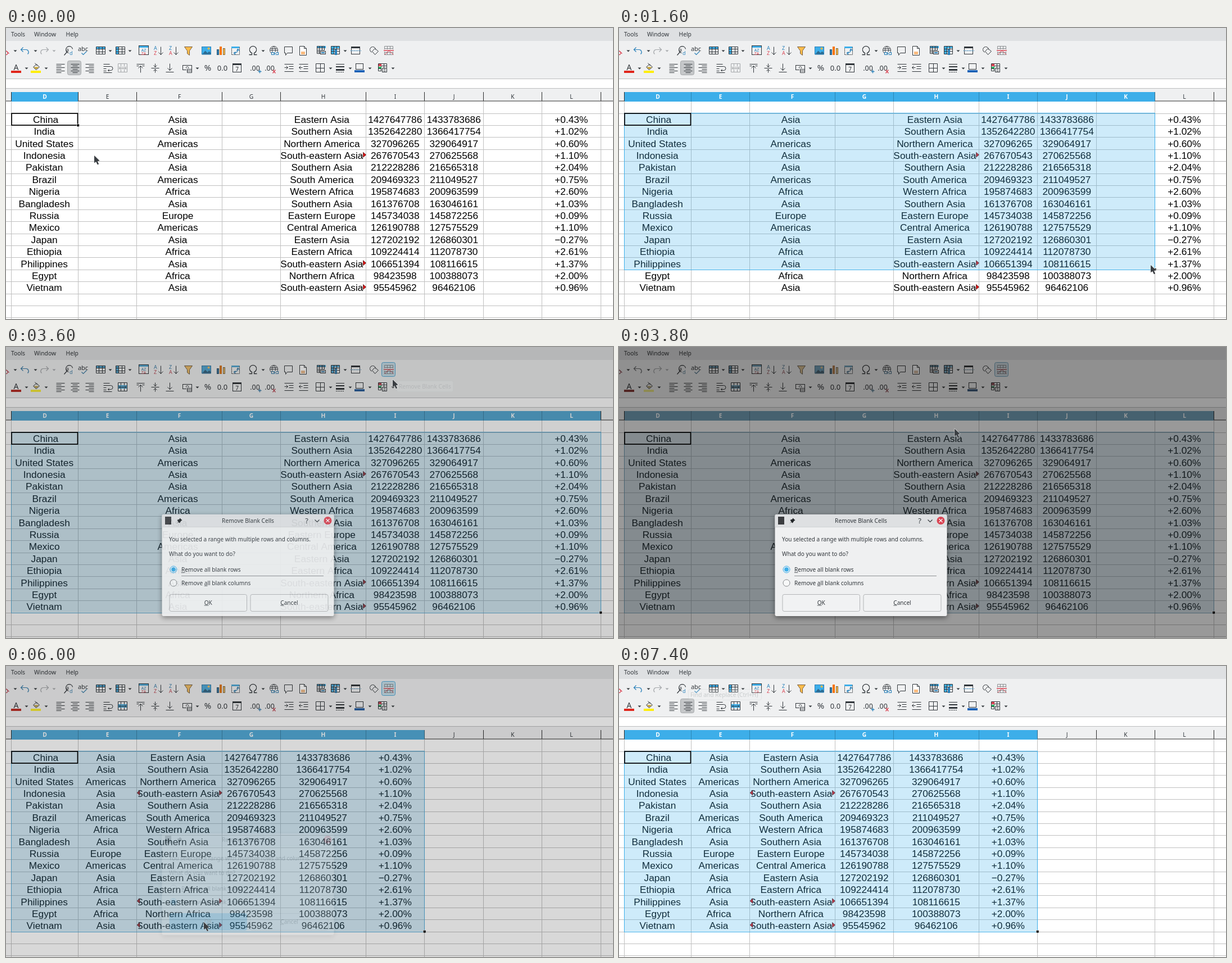
Recreate the animation shown at these times as an HTML page with a canvas. Size 1080x518 px, loop 7500 ms.

```html
<!DOCTYPE html>
<html lang="en">
<head>
<meta charset="utf-8">
<title>Remove blank columns</title>
<style>
  html, body { margin: 0; width: 100%; height: 100%; overflow: hidden; background: #eff0f1; }
  canvas { position: absolute; left: 0; top: 0; }
</style>
</head>
<body>
<script>
const W = 1080, H = 518, LOOP = 7500, STEP = 100;
const INK = '#31363b', BLUE = '#2980b9', SKY = '#3daee9', RED = '#da4453', PALE = '#eff0f1', OFF = '#a5a8ab';
const UI = '"Noto Sans", sans-serif';
const colX = [9.5, 128, 232.5, 384, 488.5, 640, 744.5, 849, 953.5, 1058];
const ROW0 = 151.7, ROWH = 21.39;
const rowY = i => Math.round(ROW0 + i * ROWH) + .5;

const rows = `China|Asia|Eastern Asia|1427647786|1433783686|+0.43%
India|Asia|Southern Asia|1352642280|1366417754|+1.02%
United States|Americas|Northern America|327096265|329064917|+0.60%
Indonesia|Asia|South-eastern Asia|267670543|270625568|+1.10%
Pakistan|Asia|Southern Asia|212228286|216565318|+2.04%
Brazil|Americas|South America|209469323|211049527|+0.75%
Nigeria|Africa|Western Africa|195874683|200963599|+2.60%
Bangladesh|Asia|Southern Asia|161376708|163046161|+1.03%
Russia|Europe|Eastern Europe|145734038|145872256|+0.09%
Mexico|Americas|Central America|126190788|127575529|+1.10%
Japan|Asia|Eastern Asia|127202192|126860301|−0.27%
Ethiopia|Africa|Eastern Africa|109224414|112078730|+2.61%
Philippines|Asia|South-eastern Asia|106651394|108116615|+1.37%
Egypt|Africa|Northern Africa|98423598|100388073|+2.00%
Vietnam|Asia|South-eastern Asia|95545962|96462106|+0.96%`.split('\n').map(r => r.split('|'));
const shift = [-.6, -2.7, -2.4, 0, 0, 0];
const sparse = [0, 2, 4, 5, 6, 8], packed = [0, 1, 2, 3, 4, 5];

// pointer tip: time, x, y
const path = [[0, 157, 227], [600, 74, 163], [800, 70, 163], [900, 140, 180], [1600, 946, 422],
  [2100, 985, 454], [2200, 985, 454], [2300, 930, 370], [2400, 832, 250], [2700, 832, 250],
  [2800, 720, 74], [3000, 688, 46], [3300, 685, 42], [3500, 688, 58], [3600, 688, 58],
  [4300, 370, 364], [4700, 367, 417], [5100, 367, 418], [5600, 352, 456], [6200, 352, 456],
  [6300, 314, 405], [6600, 314, 405], [6900, 112, 42], [7200, 110, 34], [7300, 42, 0], [7400, 42, -40]];
const dimKeys = [[3500, 0], [3600, .46], [3700, .82], [3800, 1], [5900, 1], [6000, .38], [6100, 0]];
const dialogKeys = [[3400, 0], [3500, .5], [3600, .9], [3700, 1], [5900, 1], [6000, .17], [6100, .03], [6200, .03], [6300, 0]];

function at(keys, t, k = 1) {
  if (t <= keys[0][0]) return keys[0][k];
  for (let i = 1; i < keys.length; i++) {
    const a = keys[i - 1], b = keys[i];
    if (t <= b[0]) return a[k] + (b[k] - a[k]) * (t - a[0]) / (b[0] - a[0]);
  }
  return keys[keys.length - 1][k];
}

function layer() {
  const c = document.createElement('canvas');
  c.width = W; c.height = H;
  document.body.append(c);
  return c;
}
const sheet = layer(), dialog = layer(), front = layer();
let g;

function rect(x, y, w, h, color) { g.fillStyle = color; g.fillRect(x, y, w, h); }
function frame(x, y, w, h, color, lw = 1) { g.strokeStyle = color; g.lineWidth = lw; g.strokeRect(x, y, w, h); }
function line(x1, y1, x2, y2, color, lw = 1) {
  g.strokeStyle = color; g.lineWidth = lw;
  g.beginPath(); g.moveTo(x1, y1); g.lineTo(x2, y2); g.stroke();
}
function text(s, x, y, size, color = INK, align = 'left', weight = '', family = UI) {
  g.font = `${weight} ${size}px ${family}`;
  g.textAlign = align; g.fillStyle = color;
  g.fillText(s, x, y);
}
function draw(x, y, d, color, lw) {
  g.save();
  g.translate(x + .5, y + .5);
  const p = new Path2D(d);
  if (lw) { g.strokeStyle = color; g.lineWidth = lw; g.stroke(p); }
  else { g.fillStyle = color; g.fill(p); }
  g.restore();
}
const pen = (x, y, d, color = INK, lw = 1) => draw(x, y, d, color, lw);
const fill = (x, y, d, color = INK) => draw(x, y, d, color);
const drop = (x, y, color = INK) => fill(x, y, 'M-3 -1h6l-3 3z', color);
function box(x, y, w, h, r, face, edge) {
  g.beginPath(); g.roundRect(x, y, w, h, r);
  if (face) { g.fillStyle = face; g.fill(); }
  if (edge) { g.strokeStyle = edge; g.lineWidth = 1; g.stroke(); }
}
function grid(x, y, w, h, nx, ny, color = INK) {
  let d = '';
  for (let i = 0; i <= nx; i++) d += `M${Math.round(w * i / nx)} 0v${h}`;
  for (let j = 0; j <= ny; j++) d += `M0 ${Math.round(h * j / ny)}h${w}`;
  pen(x, y, d, color);
}
// stack of horizontal bars; anchor -1 left, 0 centre, 1 right
function bars(x, y, anchor) {
  for (let i = 0; i < 6; i++) {
    const w = i % 2 ? 9 : 15;
    pen(x - 7, y - 7 + i * 3, `M${(15 - w) * (anchor + 1) / 2} 0h${w}`);
  }
}

function topIcons(undoOn, removeOn) {
  const y = 40;
  pen(0, 41, 'M-4 -4L5 4M-1 6A3 3 0 1 0 0 0', RED, 1.3);
  drop(16, y);
  const undo = undoOn ? BLUE : '#6b6e70';
  pen(33, y, 'M-3 -6L-7 -2L-3 2M-7 -2H2A4.5 4.5 0 0 1 5 6', undo, 1.2);
  drop(52, y);
  pen(68, y, 'M3 -6L7 -2L3 2M7 -2H-2A4.5 4.5 0 0 0 -5 6', OFF, 1.2);
  drop(85, y, OFF);
  pen(111, y, 'M-2 1L-8 8M7 -3A6 6 0 1 0 0 4', INK, 1.2);
  text('a', 107, 42, 9); text('d', 113, 48, 9, BLUE);
  text('abc', 137, 41, 11, INK, 'center');
  pen(137, y, 'M-3 4l3 3l6 -6', BLUE, 1.2);

  rect(161, 33, 16, 5, SKY); grid(160, 33, 16, 13, 3, 3); drop(185, y);
  rect(196, 33, 5, 14, SKY); grid(195, 33, 16, 13, 3, 3); drop(220, y);

  frame(236.5, 31.5, 17, 16, INK); rect(237, 32, 16, 3, SKY);
  text('AZ', 245, 42, 7, BLUE, 'center'); text('ZA', 245, 48, 7, RED, 'center');
  const sort = (x, a, b) => {
    text(a, x - 8, 39, 9, BLUE); text(b, x - 8, 48, 9, RED);
    pen(x, y, 'M4 -7V7M0 3l4 4l4 -4');
  };
  sort(271, 'A', 'Z'); sort(298, 'Z', 'A');
  fill(324, y, 'M-7 -7H7L2 0V8L-2 5V0Z', '#fdbc4b'); pen(324, y, 'M-7 -7H7L2 0V8L-2 5V0Z', '#7a6040');

  rect(348, 33, 17, 14, SKY); fill(356, y, 'M-8 7L-2 0L2 4L5 1L8 4V7Z', '#2d6a8f');
  fill(360, 36, 'M0 -2a2 2 0 1 0 .1 0z', '#fdbc4b'); frame(348.5, 33.5, 16, 13, BLUE);
  rect(375, 38, 4, 10, BLUE); rect(380, 33, 4, 15, '#f67400'); rect(386, 36, 4, 12, '#fdbc4b');
  frame(375.5, 38.5, 3, 9, INK, .6); frame(386.5, 36.5, 3, 11, INK, .6);
  g.setLineDash([2, 1]); frame(401.5, 33.5, 14, 14, INK); g.setLineDash([]);
  rect(401, 33, 14, 3, SKY); pen(408, y, 'M-3 4Q4 4 4 -2M2 0l2 -3l3 3M0 2l-3 2l3 3', BLUE, 1.2);

  pen(439, y, 'M-7 7H-2V4A6.2 6.2 0 1 1 2 4V7H7', INK, 1.3); drop(457, y);
  pen(476, 39, 'M0 -7A7 7 0 1 0 .1 -7M-7 0H7M0 -7C-4 -3 -4 3 0 7C4 3 4 -3 0 -7M-6 -3H6', INK, .9);
  rect(472, 43, 12, 5, PALE); pen(477, 45, 'M-4 -2H0V2H-5V-2ZM3 -2H7V2H2M-2 0H4', BLUE, 1.1);
  pen(502, y, 'M-7 -7H7V4H-2L-5 8V4H-7Z');
  fill(528, y, 'M-6 -8H2L6 -4V8H-6Z', '#fff'); pen(528, y, 'M-6 -8H2L6 -4V8H-6ZM2 -8V-4H6');
  rect(525, 42, 7, 5, '#f9b97c');

  rect(553, 32, 16, 4, SKY); grid(553, 32, 13, 13, 3, 4);
  rect(559, 40, 11, 7, PALE); frame(559.5, 41.5, 9, 5, INK); rect(561, 43, 6, 2, BLUE);
  rect(579, 32, 14, 4, SKY); rect(579, 32, 4, 14, SKY); grid(578, 32, 15, 14, 3, 3);
  rect(585, 38, 4, 10, BLUE); drop(603, y);
  frame(614.5, 33.5, 15, 13, INK); rect(614, 33, 16, 3, INK);
  g.setLineDash([2, 1]); line(613, 40.5, 632, 40.5, BLUE); g.setLineDash([]);
  pen(652, 38, 'M0 -5A5 5 0 1 0 .1 -5'); fill(656, 42, 'M-1 -5L5 -1L-1 5L-6 1Z', PALE); pen(656, 41, 'M0 -5L6 0L0 6L-5 0Z');

  if (removeOn) box(668.5, 27.5, 24, 25, 3, 'rgba(61,174,233,.25)', SKY);
  grid(673, 32, 15, 15, 3, 4, '#8b8e91');
  rect(672, 38, 18, 4, PALE); line(672, 40, 690, 40, RED, 1.5);
  pen(681, 43, 'M-8 4L0 -3L8 4', RED);
}

function formatIcons(centred, mergeOn) {
  const y = 71;
  text('A', 18, 75, 14, INK, 'center'); rect(9, 76, 18, 4, '#e0251b'); drop(36, y);
  pen(53, 69, 'M-5 0L1 -5L6 0L0 5ZM-2 -7L2 -2'); fill(53, 69, 'M-4 0H5L0 4Z', '#c9a227');
  rect(44, 76, 18, 4, '#ffee00'); drop(71, y);
  if (centred) box(109.5, 58.5, 24, 25, 3, '#c5c7c9', '#a4a7a9');
  bars(96, y, -1); bars(122, y, 0); bars(148, y, 1);
  pen(181, y, 'M-8 -7H3M-8 -3H5A3 3 0 0 1 5 4H0M2 2L0 4L2 6M-8 1H-3M-8 5H-3M-8 8H7');
  const m = mergeOn ? INK : OFF;
  grid(199, 63, 16, 15, 3, 3, m); rect(200, 68, 15, 6, mergeOn ? SKY : '#dfe0e1');
  pen(207, y, 'M-6 0H6M-4 -2L-6 0L-4 2M4 -2L6 0L4 2', m);
  pen(239, y, 'M-7 -7H7M0 8V-4M-4 0L0 -4L4 0M-7 -4H-3M3 -4H7');
  pen(265, y, 'M-7 0H7M0 -8V-2M-3 -5L0 -2L3 -5M0 8V2M-3 5L0 2L3 5');
  pen(291, y, 'M-7 7H7M0 -8V4M-4 0L0 4L4 0');

  frame(314.5, 66.5, 16, 8, INK); pen(322, 70, 'M0 -2a2 2 0 1 0 .1 0');
  rect(321, 72, 9, 8, PALE); pen(326, 76, 'M-4 -3H4M-4 0H4M-4 3H4M-4 -3V3M4 -3V3'); drop(340, y);
  text('%', 359, 76, 15, INK, 'center');
  text('0.0', 385, 76, 13, INK, 'center');
  frame(403.5, 63.5, 15, 15, INK); rect(403, 63, 16, 3, INK); text('7', 411, 77, 10, INK, 'center');
  text('.00', 443, 76, 12.5, INK, 'center'); text('.00', 469, 76, 12.5, INK, 'center');
  pen(450, 77, 'M-2 0H4M1 -3V3', BLUE, 1.3); pen(476, 77, 'M-2 -3L3 3M3 -3L-2 3', RED, 1.3);
  pen(503, y, 'M-8 -7H8M0 -3H8M0 1H8M-8 6H8M-8 -1H-2M-5 -4L-2 -1L-5 2');
  pen(529, y, 'M-8 -7H8M0 -3H8M0 1H8M-8 6H8M-8 -1H-2M-5 -4L-8 -1L-5 2');
  grid(551, 63, 15, 15, 2, 2); drop(577, y);
  rect(587, 64, 15, 1, INK); rect(587, 68, 15, 2, INK); rect(587, 73, 15, 3, INK);
  g.setLineDash([2, 1]); line(587, 78.5, 602, 78.5, INK); g.setLineDash([]); drop(612, y);
  frame(622.5, 63.5, 13, 10, INK); rect(620, 75, 18, 4, '#1c63b7'); drop(647, y);
  grid(662, 63, 15, 13, 3, 3); rect(663, 64, 5, 4, RED); rect(663, 69, 5, 3, '#27ae60');
  rect(668, 71, 10, 8, PALE); pen(672, 74, 'M-3 -3H5V4H-3ZM-1 -1H3M-1 2H3'); drop(688, y);
}

function selection(t, x, y) {
  if (t < 900) return { c: 1, r: 1 };
  if (t >= 6000) return { c: 6, r: 15 };
  if (t >= 2100) return { c: 9, r: 15 };
  return {
    c: Math.max(1, colX.filter(v => v < (t === 1600 ? 946 : x)).length),
    r: Math.min(15, Math.floor((y - ROW0) / ROWH) + 1)
  };
}

function cells(place, tight) {
  const size = 17.3, family = '"Liberation Sans", Arial, sans-serif';
  rows.forEach((row, i) => row.forEach((s, k) => {
    const c = place[k], left = colX[c], right = colX[c + 1];
    const mid = (left + right) / 2 + (i + k ? shift[k] : 1.8);
    const cy = ROW0 + (i + .5) * ROWH, long = s.length > 17;
    g.save();
    g.beginPath(); g.rect(left + (long && tight ? 3 : .5), cy - 11, right - left, 22); g.clip();
    text(s, mid, cy + 6.5, size, '#000', 'center', '', family);
    g.restore();
    if (long) {
      const mark = (x, dir) => {
        const d = `M0 -4.5L${5 * dir} 0L0 4.5Z`;
        fill(x, cy - 1.3, d, '#e01010'); pen(x, cy - 1.3, d, '#3a0a0a', .7);
      };
      mark(right - 5, 1);
      if (tight) mark(left + 5, -1);
    }
  }));
}

function drawSheet(t, x, y) {
  g = sheet.getContext('2d');
  rect(0, 0, W, H, '#fff');
  rect(0, 0, W, 23, '#dee0e2');
  rect(0, 23, W, 107, PALE);
  text('Tools', 9, 15, 10.3); text('Window', 50, 15, 10.3); text('Help', 106.5, 15, 10.3);
  topIcons(t < 3700 || t >= 6000, t >= 3100 && t < 6100);
  formatIcons(t < 2800 || t >= 6100, t >= 2800);
  rect(0, 91, W, 17, '#fff');
  line(0, 90.5, W, 90.5, '#bcbebf'); line(0, 107.5, W, 107.5, '#bcbebf');

  const sel = selection(t, x, y);
  colX.forEach(v => line(Math.floor(v) + .5, 131, Math.floor(v) + .5, H, '#c0c0c0'));
  for (let i = 0; i < 18; i++) line(0, rowY(i), W, rowY(i), '#c0c0c0');
  cells(t < 6000 ? sparse : packed, t >= 6000);

  line(0, 130, W, 130, '#2b2b2b');
  colX.forEach(v => line(Math.floor(v) + .5, 114, Math.floor(v) + .5, 130, '#2b2b2b'));
  const right = colX[sel.c], bottom = ROW0 + sel.r * ROWH;
  rect(10, 114, right - 10, 17, SKY);
  for (let c = 1; c < sel.c; c++) line(Math.floor(colX[c]) + .5, 114, Math.floor(colX[c]) + .5, 131, '#2b86b5');
  [...'DEFGHIJKL'].forEach((s, c) => {
    const on = c < sel.c;
    text(s, (colX[c] + colX[c + 1]) / 2 + .3, 126, 10.3, on ? '#fff' : INK, 'center', on ? 'bold' : '');
  });

  if (sel.c > 1 || sel.r > 1) {
    rect(9.5, 152, right - 9.5, bottom - 152, 'rgba(61,174,233,.25)');
    frame(9.5, 151.5, Math.floor(right) - 9, Math.round(bottom) - 151, SKY);
  }
  frame(10, 152, 117.5, 21, '#000', 1.7);
  rect(right - 2.5, bottom - 2.5, 5, 5, '#fff');
  rect(right - 1.8, bottom - 1.8, 4, 4, '#000');

  const v = at(dimKeys, t);
  sheet.style.filter = v ? `brightness(${1 - .4 * v}) saturate(${1 - .6 * v})` : 'none';
}

// label whose letter at index k is underlined
function label(s, x, y, k) {
  text(s, x, y, 10.1);
  const a = x + g.measureText(s.slice(0, k)).width;
  line(a, y + 1.5, a + g.measureText(s[k]).width, y + 1.5, INK, .8);
}
function radio(y, on, hover) {
  g.beginPath(); g.arc(298, y, 6, 0, 7);
  g.fillStyle = on ? '#dcebf4' : '#f7f8f8'; g.fill();
  g.strokeStyle = on || hover ? SKY : '#85888b'; g.lineWidth = 1; g.stroke();
  if (on) { g.beginPath(); g.arc(298, y, 3.8, 0, 7); g.fillStyle = SKY; g.fill(); }
}
function button(x, w, s, mode) {
  box(x, 440.5, w, 30, 3, mode === 2 ? SKY : '#f1f2f3', mode ? SKY : '#b3b5b7');
  g.font = `10.1px ${UI}`;
  label(s, x + (w - g.measureText(s).width) / 2, 458.5, 0);
}

function drawDialog(t) {
  const alpha = at(dialogKeys, t);
  dialog.style.opacity = alpha;
  g = dialog.getContext('2d');
  g.clearRect(0, 0, W, H);
  if (!alpha) return;
  g.save();
  g.shadowColor = 'rgba(0,0,0,.45)'; g.shadowBlur = 10; g.shadowOffsetY = 3;
  box(277.5, 298, 306, 181, 3, PALE);
  g.restore();
  box(277.5, 298, 306, 22, [3, 3, 0, 0], '#dee0e2');
  line(278, 320.5, 583, 320.5, '#d0d2d4');
  rect(283, 302, 11, 14, '#3b3d40');
  fill(308, 309, 'M1 -5L5 -1L3 0L1 3L0 4L-2 2L-5 5L-2 1L-4 -1L-3 -2L0 -3Z', '#232629');
  text('Remove Blank Cells', 430.5, 313, 10.2, INK, 'center');
  text('?', 535, 314, 13, INK, 'center');
  pen(553, 309, 'M-4 -2L0 2L4 -2', INK, 1.1);
  g.beginPath(); g.arc(572.5, 309, 7, 0, 7); g.fillStyle = RED; g.fill();
  pen(572, 308.5, 'M-3 -3L3 3M3 -3L-3 3', '#fff', 1.1);

  text('You selected a range with multiple rows and columns.', 290, 346, 10);
  text('What do you want to do?', 290, 371.5, 10.1);
  const columns = t >= 5000, pressed = t >= 5800;
  radio(396, !columns, false);
  radio(420, columns, t >= 4600 && t < 5400);
  label('Remove all blank rows', 312, 400, 0);
  label('Remove all blank columns', 312, 423.7, 7);
  if (!pressed) {
    const y = columns ? 431.5 : 407.5;
    line(312, y, 565, y, columns ? SKY : '#8d9093');
  }
  button(291, 137.5, 'OK', pressed ? 2 : t >= 5500 ? 1 : 0);
  button(435, 138, 'Cancel', 0);
}

function tip(s, x, y, w, alpha) {
  if (!alpha) return;
  g.globalAlpha = alpha;
  box(x + .5, y + .5, w, 19, 3, 'rgba(239,240,241,.92)', '#b4b7ba');
  text(s, x + 4, y + 14, 10.2);
  g.globalAlpha = 1;
}

function drawFront(t, x, y) {
  g = front.getContext('2d');
  g.clearRect(0, 0, W, H);
  if (t >= 2800 && t < 3000) tip('Input line', 749, 121, 53, t < 2900 ? .92 : .4);
  if (t === 3500) tip('Remove Blank Cells', 695, 60, 100, .7);
  if (t === 3600) tip('Remove Blank Cells', 695, 60, 100, .13);
  if (t >= 7100) tip('Find and Replace (Ctrl+H)', 123, 41, 130, t < 7300 ? .95 : t < 7400 ? .7 : .2);
  g.save();
  g.translate(x, y);
  const arrow = new Path2D('M0 0V13.2L3.2 11L5.8 16.3L8.2 15.2L5.8 10.2L9.6 9.2Z');
  g.lineJoin = 'round';
  g.strokeStyle = 'rgba(255,255,255,.7)'; g.lineWidth = 1.2; g.stroke(arrow);
  g.fillStyle = '#3a3e42'; g.fill(arrow);
  g.restore();
}

let last = -1;
function tick(now) {
  const t = Math.floor(now % LOOP / STEP) * STEP;
  if (t !== last) {
    last = t;
    const x = at(path, t, 1), y = at(path, t, 2);
    drawSheet(t, x, y);
    drawDialog(t);
    drawFront(t, x, y);
  }
  requestAnimationFrame(tick);
}
tick(0);
</script>
</body>
</html>
```
